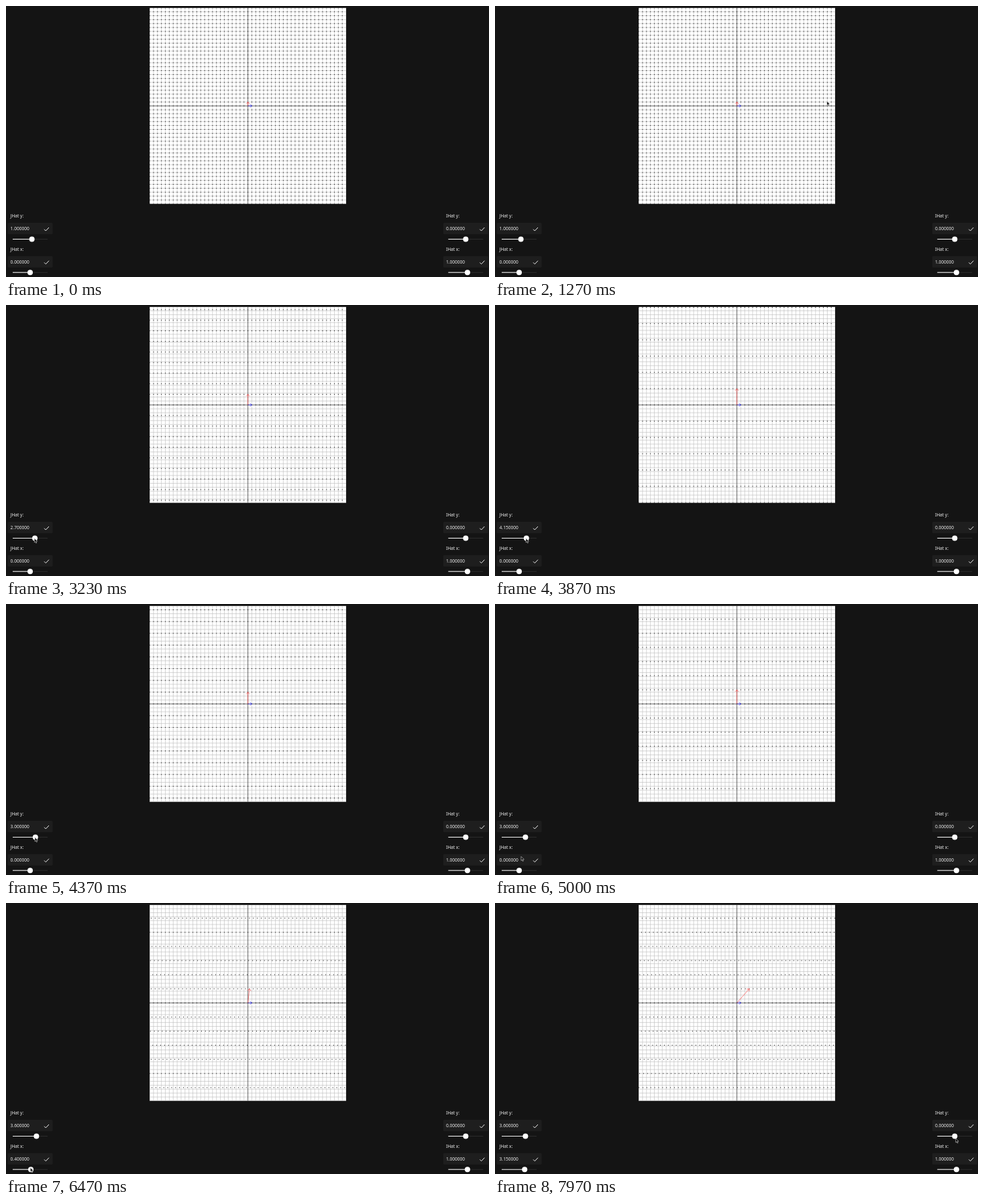
Recreate the animation shown at these times as an HTML page with a canvas. Size 720 px wide and 405 px high, loop 8000 ms.

```html
<!DOCTYPE html>
<html lang="en">
<head>
<meta charset="utf-8">
<title>Basis vectors</title>
<style>
  html, body { margin: 0; overflow: hidden; background: #141414; }
  canvas { display: block; }
</style>
</head>
<body>
<canvas id="stage" width="720" height="405"></canvas>
<script>
const ctx = document.getElementById('stage').getContext('2d');
const LOOP = 8000;
const CX = 360.6, CY = 149.3, UNIT = 5.86, HALF = 25, SIZE = HALF * UNIT;

// Smooth progress from 0 to 1 between two times.
function ease(t, start, end) {
  const u = Math.min(1, Math.max(0, (t - start) / (end - start)));
  return u * u * (3 - 2 * u);
}

const snap = v => Math.round(v * 20) / 20;
const knobX = value => 36 + value * 2.6;

const jHatY = t => snap(1 + 2.5 * ease(t, 3070, 3330) + 0.65 * ease(t, 3600, 3870)
  - 1.15 * ease(t, 3870, 4370) + 0.6 * ease(t, 4370, 4600));
const jHatX = t => snap(-2.9 * ease(t, 5440, 5770) + 6.05 * ease(t, 5900, 6975));

// The pointer glides from stop to stop and follows a knob while it rests on it.
function pointerAt(t, jx, jy) {
  let x = 722, y = 407;
  const glide = (start, end, toX, toY, arc = 0) => {
    const s = ease(t, start, end);
    x += (toX - x) * s;
    y += (toY - y) * s - arc * 4 * s * (1 - s);
  };
  glide(500, 700, 717.5, 402.5);
  glide(840, 1670, 296, 321, 218);
  glide(1700, 2270, 19, 353.5);
  glide(2300, 2700, knobX(jy) - 1, 348.5);
  glide(4600, 5300, knobX(jx) - 1, 395.5);
  glide(6975, 7930, 686.5, 351.5);
  return [x, y];
}

function polyline(points, color, width) {
  ctx.beginPath();
  points.forEach(([x, y]) => ctx.lineTo(x, y));
  ctx.strokeStyle = color;
  ctx.lineWidth = width;
  ctx.stroke();
}

// One vertical and one horizontal line, each d away from the middle.
function cross(d, color, width) {
  polyline([[CX + d, CY - SIZE], [CX + d, CY + SIZE]], color, width);
  polyline([[CX - SIZE, CY + d], [CX + SIZE, CY + d]], color, width);
}

function vector(x, y, color) {
  const tipX = CX + x * UNIT, tipY = CY - y * UNIT;
  const angle = Math.atan2(-y, x);
  const barb = turn => [tipX - 4 * Math.cos(angle + turn), tipY - 4 * Math.sin(angle + turn)];
  polyline([[CX, CY], [tipX, tipY]], color, 0.6);
  polyline([barb(0.7), [tipX, tipY], barb(-0.7)], color, 0.6);
}

function plot(jx, jy) {
  ctx.save();
  ctx.beginPath();
  ctx.rect(CX - SIZE, CY - SIZE, SIZE * 2, SIZE * 2);
  ctx.clip();
  ctx.fillStyle = '#fff';
  ctx.fillRect(CX - SIZE, CY - SIZE, SIZE * 2, SIZE * 2);

  for (let i = -HALF; i <= HALF; i++) cross(i * UNIT, '#bbb', 0.6);
  cross(0, '#222', 0.6);

  ctx.fillStyle = '#000';
  const rows = Math.floor(HALF / jy);
  for (let j = -rows; j <= rows; j++) {
    const shift = j * jx;
    for (let x = Math.ceil(-HALF - shift - 1e-6) + shift; x < HALF - 1e-6; x++) {
      ctx.fillRect(CX + x * UNIT - 0.5, CY - j * jy * UNIT - 0.5, 1, 1);
    }
  }
  vector(1, 0, '#22f');
  vector(jx, jy, '#f33');
  ctx.restore();
}

function control(x, y, label, value) {
  ctx.save();
  ctx.translate(x, y);
  ctx.fillStyle = '#1e1e1e';
  ctx.beginPath();
  ctx.roundRect(2.5, 324, 67, 17, 1.5);
  ctx.fill();

  ctx.fillStyle = '#eee';
  ctx.font = '6.6px "Noto Sans", sans-serif';
  ctx.fillText(label, 6.6, 316);
  ctx.fillText(value.toFixed(6), 6.6, 335.2);
  polyline([[57, 333.7], [59.3, 336], [64, 331]], '#eee', 1);

  const knob = knobX(value);
  polyline([[10, 348.5], [62, 348.5]], '#2c2c2c', 1.1);
  polyline([[10, 348.5], [knob, 348.5]], '#eee', 1.1);
  ctx.fillStyle = '#fff';
  ctx.beginPath();
  ctx.arc(knob, 348.5, 4, 0, Math.PI * 2);
  ctx.fill();
  ctx.restore();
}

function pointer(x, y) {
  ctx.save();
  ctx.translate(x, y);
  const arrow = new Path2D('M.3 .3V6.3L1.7 5.1 2.7 7.4 3.7 6.9 2.7 4.7 4.6 4.6Z');
  ctx.fillStyle = '#000';
  ctx.fill(arrow);
  ctx.strokeStyle = '#ddd';
  ctx.lineWidth = 0.6;
  ctx.stroke(arrow);
  ctx.restore();
}

function draw(t) {
  const jx = jHatX(t), jy = jHatY(t);
  const right = 649.3, lower = 49.7;
  ctx.fillStyle = '#141414';
  ctx.fillRect(0, 0, 720, 405);
  plot(jx, jy);
  control(0, 0, 'JHat y:', jy);
  control(0, lower, 'JHat x:', jx);
  control(right, 0, 'IHat y:', 0);
  control(right, lower, 'IHat x:', 1);
  pointer(...pointerAt(t, jx, jy));
}

function frame() {
  draw(performance.now() % LOOP);
  requestAnimationFrame(frame);
}
frame();
</script>
</body>
</html>
```
